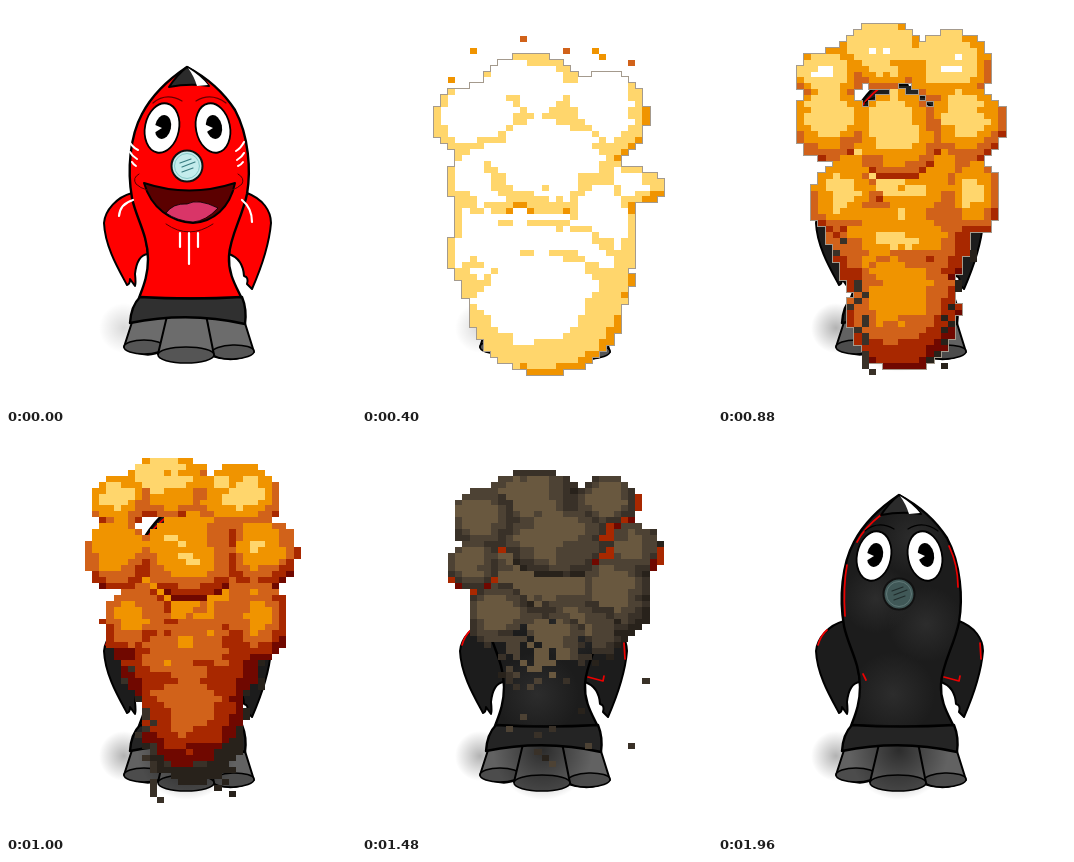
Recreate the animation shown at these times as an HTML page with a canvas. Size 350 by 400 pixels, loop 3.2 s.

```html
<!DOCTYPE html>
<html lang="en">
<head>
<meta charset="utf-8">
<title>Rocket blast</title>
<style>
  html, body { margin: 0; width: 100%; height: 100%; overflow: hidden; background: #fff; }
  canvas { display: block; width: 350px; height: 400px; }
</style>
</head>
<body>
<canvas id="stage" width="350" height="400"></canvas>
<script>
const ctx = document.getElementById('stage').getContext('2d');
const LOOP = 3200, START = 160, STEP = 120, CLEAR = 1960, CHAR_AT = 600;
const clamp = (v, a, b) => Math.max(a, Math.min(b, v));
const lerp = (a, b, k) => a + (b - a) * k;

// ---------- rocket ----------
const BODY = 'M181 61C166 71 147 87 136 108C124 130 121 164 126 192C130 212 142 229 142 253C142 270 137 281 133 292L236 293C230 280 222 268 223 250C224 230 236 212 241 188C245 165 243 130 229 104C216 84 198 70 181 61Z';
const ARM_L = 'M126 187C111 191 99 204 98 217C99 241 113 264 121 279Q124 278 124 273L129 280Q130 277 129 268Q131 249 142 248Q139 222 126 187Z';
const ARM_R = 'M241 187C257 193 265 205 265 217C263 241 253 267 246 283L241 278Q243 271 238 270Q237 253 223 248Q225 222 241 187Z';
const CAP = 'M163 81Q171 69 181 61Q194 68 203 80Q183 77 163 81Z';
const BAND = 'M134 291Q184 294 236 291Q241 303 239 318Q182 305 124 317Q125 300 134 291Z';
const NOZZLES = [
  ['M127 313L118 341Q140 354 156 345L162 310Z', 138, 341, 20, 7, 0],
  ['M200 309L238 314L248 346Q230 358 206 350Z', 227, 346, 21, 7, -.03],
  ['M161 310L152 348Q180 362 208 349L200 309Z', 180, 349, 28, 8, 0]
];

function shape(d, fill, line, width = 2) {
  const path = new Path2D(d);
  if (fill) { ctx.fillStyle = fill; ctx.fill(path); }
  if (line) { ctx.strokeStyle = line; ctx.lineWidth = width; ctx.stroke(path); }
}

function oval(x, y, rx, ry, turn, fill, line, width = 2) {
  ctx.beginPath();
  ctx.ellipse(x, y, rx, ry, turn, 0, 7);
  if (fill) { ctx.fillStyle = fill; ctx.fill(); }
  if (line) { ctx.strokeStyle = line; ctx.lineWidth = width; ctx.stroke(); }
}

function glow(x, y, r, rgb, alpha) {
  const g = ctx.createRadialGradient(x, y, 0, x, y, r);
  g.addColorStop(0, `rgba(${rgb},${alpha})`);
  g.addColorStop(1, `rgba(${rgb},0)`);
  ctx.fillStyle = g;
  ctx.fillRect(x - r, y - r, 2 * r, 2 * r);
}

function eye(x, side) {
  oval(x, 122, 17, 25, side * .2, '#fff', '#000', 1.8);
  ctx.save();
  ctx.translate(x + 1, 121);
  ctx.rotate(side * .2);
  oval(0, 0, 8, 12, 0, '#000');
  ctx.restore();
  shape(`M${x - 9} 118L${x} 122L${x - 8} 127Z`, '#fff');
}

function face() {
  shape('M138 177Q183 192 229 177C224 202 207 216 187 217C165 216 145 202 138 177Z', '#5b0000', '#000', 2);
  shape('M160 207Q167 197 181 198Q192 192 212 202Q200 215 187 216Q171 215 160 207Z', '#d93568', '#000', .8);
  shape('M133 168Q126 172 130 178Q134 182 141 184M232 168Q239 172 236 178Q232 182 226 184M160 218Q183 234 207 218', null, '#500', 1);
  shape('M123 135Q126 141 132 144M124 146Q126 150 131 153M126 156Q127 158 130 160M238 136Q235 142 230 145M238 147Q236 151 231 154M237 156Q235 159 232 160', null, '#fff', 2);
  shape('M174 227V241M183 227V258M192 227V241M113 210Q114 198 127 194M236 194Q246 202 246 216', null, '#fff', 2.2);
}

function soot() {
  ctx.save();
  ctx.clip(new Path2D(BODY));
  for (const [x, y, r] of [[158, 165, 34], [208, 190, 38], [175, 260, 42], [195, 105, 36]]) glow(x, y, r, '75,75,75', .35);
  ctx.restore();
  shape('M164 80Q146 94 139 108M129 131Q125 152 127 182M231 112Q240 131 240 153M100 211Q103 201 109 196M262 209L263 225M145 240L148 246M226 243L241 247L242 242', null, '#e00', 1.7);
}

function rocket(charred) {
  ctx.lineJoin = ctx.lineCap = 'round';
  glow(118, 322, 25, '0,0,0', charred ? .3 : .15);
  const skin = charred ? '#1c1c1c' : '#f00';
  for (const [d, ...rim] of NOZZLES) {
    shape(d, charred ? '#626262' : '#6c6c6c', '#000');
    oval(...rim, charred ? '#4c4c4c' : '#555', '#000', 1.6);
  }
  if (charred) glow(181, 316, 50, '0,0,0', .55);
  shape(ARM_L, skin, '#000');
  shape(ARM_R, skin, '#000');
  shape(BODY, skin, '#000', 2.4);
  shape(BAND, charred ? '#242424' : '#303030', '#000', 2.4);
  if (charred) soot(); else face();
  shape(CAP, '#2b2b2b', '#000');
  shape('M182 62Q195 70 202 79L191 80Q188 70 182 62Z', '#fff');
  shape('M147 97Q160 86 176 95M190 95Q205 86 220 97', null, charred ? '#000' : '#600', 1.2);
  eye(156, 1);
  eye(207, -1);
  oval(181, 160, 15.5, 15.5, 0, charred ? '#405857' : '#c4ecec', '#111', 2);
  oval(181, 160, 12.5, 12.5, 0, null, charred ? '#607877' : '#86c9c9', 1);
  shape('M174 157L185 153M176 161L189 156M176 166L187 162', null, charred ? '#202c2c' : '#387b80', 1.2);
}

// ---------- blast ----------
// Puffs are [x, y, rx, ry], painted back to front.
const KEYS = [
  { t: 400, base: 0, spread: 1.6, tilt: 0, fade: 400, puffs: [
    [183,210,88,110], [168,88,52,40], [118,115,47,36], [243,110,42,45], [130,175,44,36], [258,181,44,20],
    [190,160,65,50], [125,245,38,40], [240,235,34,60], [185,275,85,60], [184,305,75,63]] },
  { t: 640, base: .5, spread: 1.9, tilt: 0, fade: 400, puffs: [
    [183,200,78,100], [178,55,60,32], [122,88,50,30], [240,68,42,30], [118,140,47,30], [255,138,45,42],
    [188,215,60,42], [118,220,33,36], [268,218,26,38], [187,280,80,48], [183,330,52,40]] },
  { t: 880, base: 1.25, spread: 2, tilt: .6, fade: 400, puffs: [
    [182,200,75,110], [165,50,45,33], [112,70,34,26], [232,62,42,36], [112,118,36,36], [250,118,37,36],
    [180,130,42,45], [128,195,36,36], [258,192,24,36], [185,240,62,50], [186,305,55,60]] },
  { t: 1240, base: 3.4, spread: 2.2, tilt: 1.6, fade: 200, puffs: [
    [190,180,82,80], [158,58,48,28], [120,60,28,24], [240,72,42,34], [112,128,27,36], [270,124,32,34],
    [195,110,60,40], [140,180,34,40], [250,180,38,48], [190,215,60,45], [190,250,50,70]] },
  { t: 1480, base: 6.8, spread: 1, tilt: 0, fade: 180, puffs: [
    [188,150,80,80], [170,66,50,30], [122,88,32,34], [245,70,34,28], [112,132,28,26], [272,118,30,28],
    [200,110,55,35], [140,185,34,34], [255,165,36,42], [210,200,50,38], [185,225,48,50]] }
];
KEYS.push({ ...KEYS[4], t: 1840, fade: 32 });

const FIRE = ['#fff', '#ffd66c', '#f09400', '#d1621a', '#a82800', '#700800'];
const SMOKE = ['#69583f', '#4d4234', '#393128', '#28221b'];
const COLS = 32, ROWS = 61;
const cellX = i => Math.round(71.6 + 7.2 * i);
const cellY = j => Math.round(6 + 5.95 * j);

function hash(a, b) {
  const v = Math.sin(a * 127.1 + b * 311.7) * 43758.5453;
  return v - Math.floor(v);
}

function noise(x, y) {
  const a = Math.floor(x), b = Math.floor(y);
  const u = x - a, v = y - b;
  return lerp(lerp(hash(a, b), hash(a + 1, b), u), lerp(hash(a, b + 1), hash(a + 1, b + 1), u), v);
}

function blastAt(t) {
  const n = clamp(KEYS.findIndex(k => k.t >= t), 1, KEYS.length - 1);
  const a = KEYS[n - 1], b = KEYS[n];
  const k = clamp((t - a.t) / (b.t - a.t), 0, 1);
  const size = clamp(.4 + (t - START) / 380, .4, 1);
  const state = {
    puffs: a.puffs.map((p, i) => p.map((v, m) => {
      const value = lerp(v, b.puffs[i][m], k);
      const origin = [183, 205, 0, 0][m];
      return origin + (value - origin) * size;
    }))
  };
  for (const name of ['base', 'spread', 'tilt', 'fade']) state[name] = lerp(a[name], b[name], k);
  return state;
}

function cellColor(i, j, s) {
  const x = 75.2 + 7.2 * i, y = 9 + 5.95 * j;
  if (hash(i, j + 90) * .6 + noise(i / 2, j / 3) * .4 < (y - s.fade) / 100) return null;
  let light = null;
  for (const [cx, cy, rx, ry] of s.puffs) {
    const u = (x - cx) / rx, v = (y - cy) / ry;
    if (u * u + v * v < 1) light = 1 - (u + .1) ** 2 - (v + .2) ** 2;
  }
  if (light === null) return null;
  light += (noise(i / 3, j / 1.6) - .5) * .55 + (hash(i, j) - .5) * .16;
  const heat = s.base + (1 - light) * s.spread + s.tilt * (y - 110) / 100;
  if (heat < FIRE.length) return FIRE[Math.max(0, Math.floor(heat))];
  if (light < .02 && y > 60 && y < 168 && noise(i / 4, j / 4 + 40) > .5) return FIRE[hash(i, 7) > .5 ? 4 : 5];
  return SMOKE[clamp(Math.floor((1 - light) * 3), 0, 3)];
}

function block(x, y, color) {
  const i = Math.round((x - 71.6) / 7.2), j = Math.round((y - 6) / 5.95);
  ctx.fillStyle = color;
  ctx.fillRect(cellX(i), cellY(j), cellX(i + 1) - cellX(i), cellY(j + 1) - cellY(j));
}

function debris(t) {
  if (t >= 280 && t < 760) {
    const rise = (t - 400) * .12;
    for (const [x, y, c] of [[158,30,3], [201,42,3], [230,42,2], [111,42,2], [266,54,3], [86,72,2], [237,48,2]]) {
      if (y - rise >= 6) block(x, y - rise, FIRE[c]);
    }
  }
  if (t >= 760 && t < 1120) {
    for (let n = 0; n < 32; n++) {
      const side = n % 2 ? 1 : -1, y = 235 + 128 * hash(n, 3);
      block(183 + side * (70 - (y - 235) * .25 - 15 * hash(n, 5)), y, SMOKE[2 + n % 4 % 2]);
    }
  }
  if (t >= 1120 && t < 1720) {
    const fall = (t - 1240) * .1;
    const specks = [[280,218], [266,285], [86,245], [93,257], [108,273], [115,285], [287,291], [244,297], [266,273], [215,357], [187,327]];
    for (const [x, y] of t < 1400 ? specks : specks.slice(0, 2)) block(x, y + fall, SMOKE[2]);
    for (let n = 0; n < 10; n++) block(143 + 85 * hash(n, 11), 245 + 75 * hash(n, 12) + fall, SMOKE[1 + n % 3]);
  }
}

function blast(t) {
  const state = blastAt(t), cells = [];
  for (let j = 0; j < ROWS; j++) {
    for (let i = 0; i < COLS; i++) {
      const color = cellColor(i, j, state);
      if (color) cells.push([cellX(i), cellY(j), cellX(i + 1) - cellX(i), cellY(j + 1) - cellY(j), color]);
    }
  }
  if (t < 1000) {
    ctx.fillStyle = '#a49a8d';
    for (const [x, y, w, h] of cells) ctx.fillRect(x - 1, y - 1, w + 2, h + 2);
  }
  for (const [x, y, w, h, color] of cells) {
    ctx.fillStyle = color;
    ctx.fillRect(x, y, w, h);
  }
  debris(t);
}

function frame(now) {
  const t = now % LOOP;
  const stepped = t < START ? 0 : START + Math.floor((t - START) / STEP) * STEP;
  ctx.fillStyle = '#fff';
  ctx.fillRect(0, 0, 350, 400);
  rocket(stepped > CHAR_AT);
  if (stepped >= START && stepped < CLEAR) blast(stepped);
  requestAnimationFrame(frame);
}
requestAnimationFrame(frame);
</script>
</body>
</html>
```
